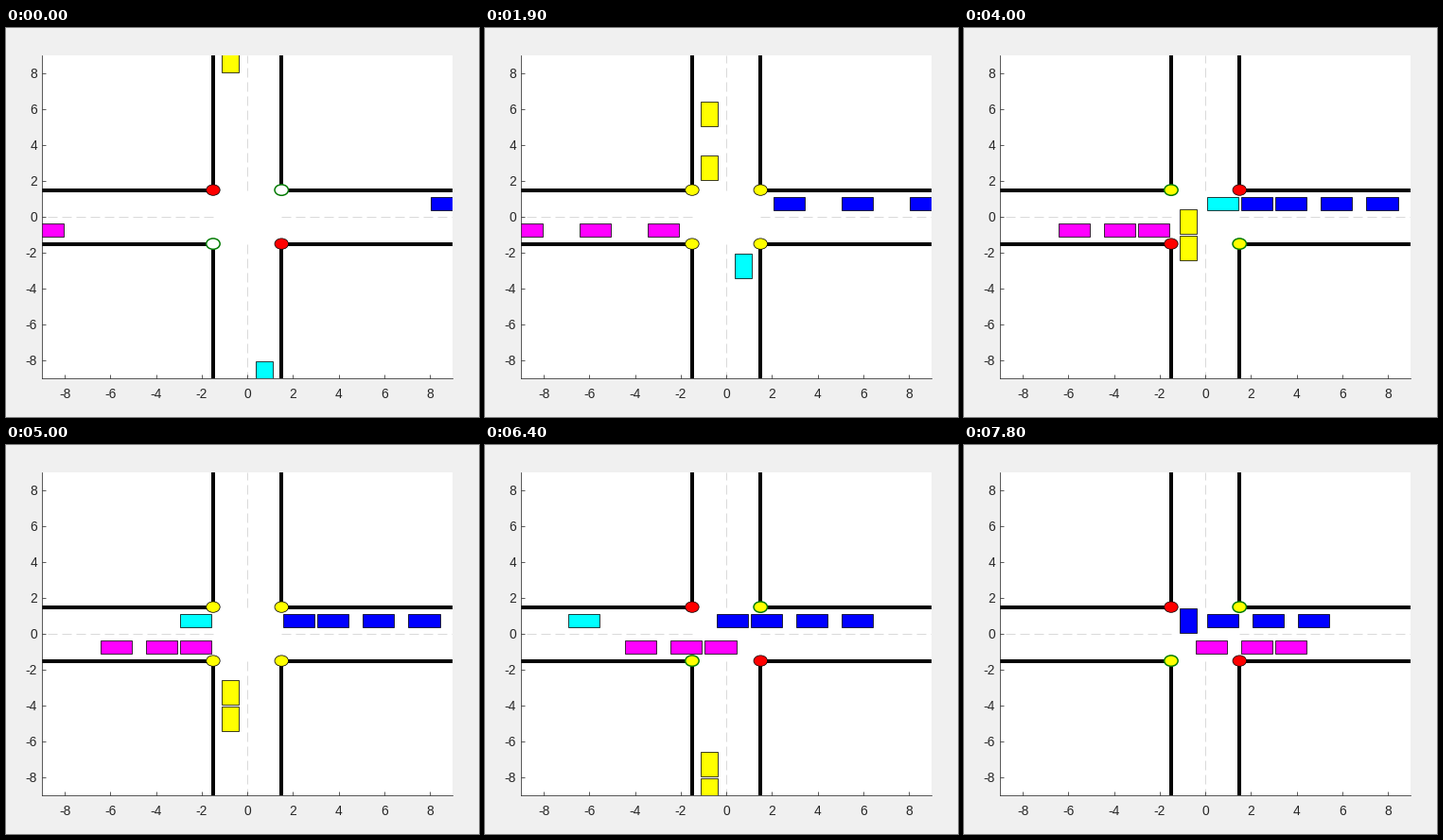
A matplotlib script for the animation above (8 s loop, 500 px wide and 412 px high).

```python
import matplotlib.pyplot as plt
import numpy as np
from matplotlib.animation import FuncAnimation
from matplotlib.patches import Circle, Rectangle

W, H, DPI = 500, 412, 100
PX = 72 / DPI                      # one pixel in points
HAIR = 0.75 * PX
LIM, ROAD, LANE = 9, 1.5, 0.75
CAR_LEN, CAR_WID = 1.375, 0.75
START, TURN = 8.75, 9.5            # spawn distance from centre, path length at the turn
INK = "#262626"
EAST, WEST, NORTH, SOUTH = (1, 0), (-1, 0), (0, 1), (0, -1)

plt.rcParams["font.family"] = "Liberation Sans"
fig = plt.figure(figsize=(W / DPI, H / DPI), dpi=DPI, facecolor="#f0f0f0")
ax = fig.add_axes([38.1 / W, 1 - 371.1 / H, 434 / W, 342 / H])
ax.set(xlim=(-LIM, LIM), ylim=(-LIM, LIM), facecolor="white")


def draw_axes():
    ticks = range(-8, 9, 2)
    ax.set_xticks(ticks, [""] * len(ticks))
    ax.set_yticks(ticks, [""] * len(ticks))
    ax.tick_params(direction="in", length=4.3 * PX, width=HAIR, color=INK)
    for side, spine in ax.spines.items():
        spine.set(visible=side in ("left", "bottom"), color=INK, linewidth=HAIR)
    style = dict(textcoords="offset points", va="baseline", color=INK,
                 fontsize=13.8 * PX, annotation_clip=False)
    for v in ticks:
        ax.annotate(str(v), (v, -LIM), xytext=(0, -21 * PX), ha="center", **style)
        ax.annotate(str(v), (-LIM, v), xytext=(-5 * PX, -5 * PX), ha="right", **style)


def draw_roads():
    edge = dict(color="black", lw=4 * PX, solid_capstyle="butt", zorder=1.5)
    middle = dict(color="#dadada", lw=PX, ls=(0, (10, 5)), zorder=1)
    for a in (-1, 1):
        arm = [a * ROAD, a * LIM]
        ax.plot([0, 0], arm, **middle)
        ax.plot(arm, [0, 0], **middle)
        for b in (-ROAD, ROAD):
            ax.plot([b, b], arm, **edge)
            ax.plot(arm, [b, b], **edge)


class Light:
    def __init__(self, x, y, first):
        self.first = first         # green in the first, third, ... phase
        self.disc = ax.add_patch(Circle((x, y), 0.3, zorder=3))

    def update(self, step):
        phase, tick = divmod(step, 9)
        face, edge, width = "red", "black", HAIR
        if tick >= 6:
            face = "yellow"
        elif self.first == (phase % 2 == 0):
            face = "white" if phase == 0 else "yellow"
            edge, width = "#007a00", 1.5 * PX
        self.disc.set(facecolor=face, edgecolor=edge, linewidth=width)


class Car:
    def __init__(self, color, heading, spawn, queue, go, wait=0, turns=False):
        self.heading = np.array(heading)
        self.spawn, self.queue, self.go = spawn, queue, go
        self.wait, self.turns = wait, turns
        self.body = ax.add_patch(Rectangle((0, 0), 1, 1, facecolor=color,
                                           edgecolor="black", lw=HAIR, zorder=2))

    def path_length(self, step):
        if step < self.go:
            return min(step - self.spawn, self.queue)
        moved = step - self.go + 1
        # give way after three moves into the crossing
        return self.queue + moved - min(max(moved - 3, 0), self.wait)

    def update(self, step):
        s = self.path_length(step)
        hx, hy = self.heading
        left = np.array([-hy, hx])
        turned = self.turns and s >= TURN
        ahead = min(s, TURN) if self.turns else s
        pos = self.heading * (ahead - START) - left * LANE
        if turned:
            pos = pos + left * (s - TURN)
        along_x = bool(hx) != turned
        w, h = (CAR_LEN, CAR_WID) if along_x else (CAR_WID, CAR_LEN)
        self.body.set(xy=(pos[0] - w / 2, pos[1] - h / 2), width=w, height=h,
                      visible=bool(s >= 0))


draw_axes()
draw_roads()

lights = [Light(x, y, first=x == y) for x in (-ROAD, ROAD) for y in (-ROAD, ROAD)]

queues = [(0, 6.5), (3, 5), (6, 3), (9, 1)]      # spawn step, path length at the stop
cars = [Car("magenta", EAST, *q, go=18) for q in queues[:3]]
cars += [Car("blue", WEST, *q, go=18, wait=99, turns=True) for q in queues]
cars += [Car("yellow", SOUTH, *q, go=9) for q in queues[:2]]
cars += [Car("cyan", NORTH, *queues[0], go=9, wait=1, turns=True)]


def update(frame):
    step = (100 * frame + 287) // 349            # one move about every 349 ms
    for part in lights + cars:
        part.update(step)
    return []


anim = FuncAnimation(fig, update, frames=80, interval=100, repeat=True,
                     repeat_delay=0, blit=False)
plt.show()
```
